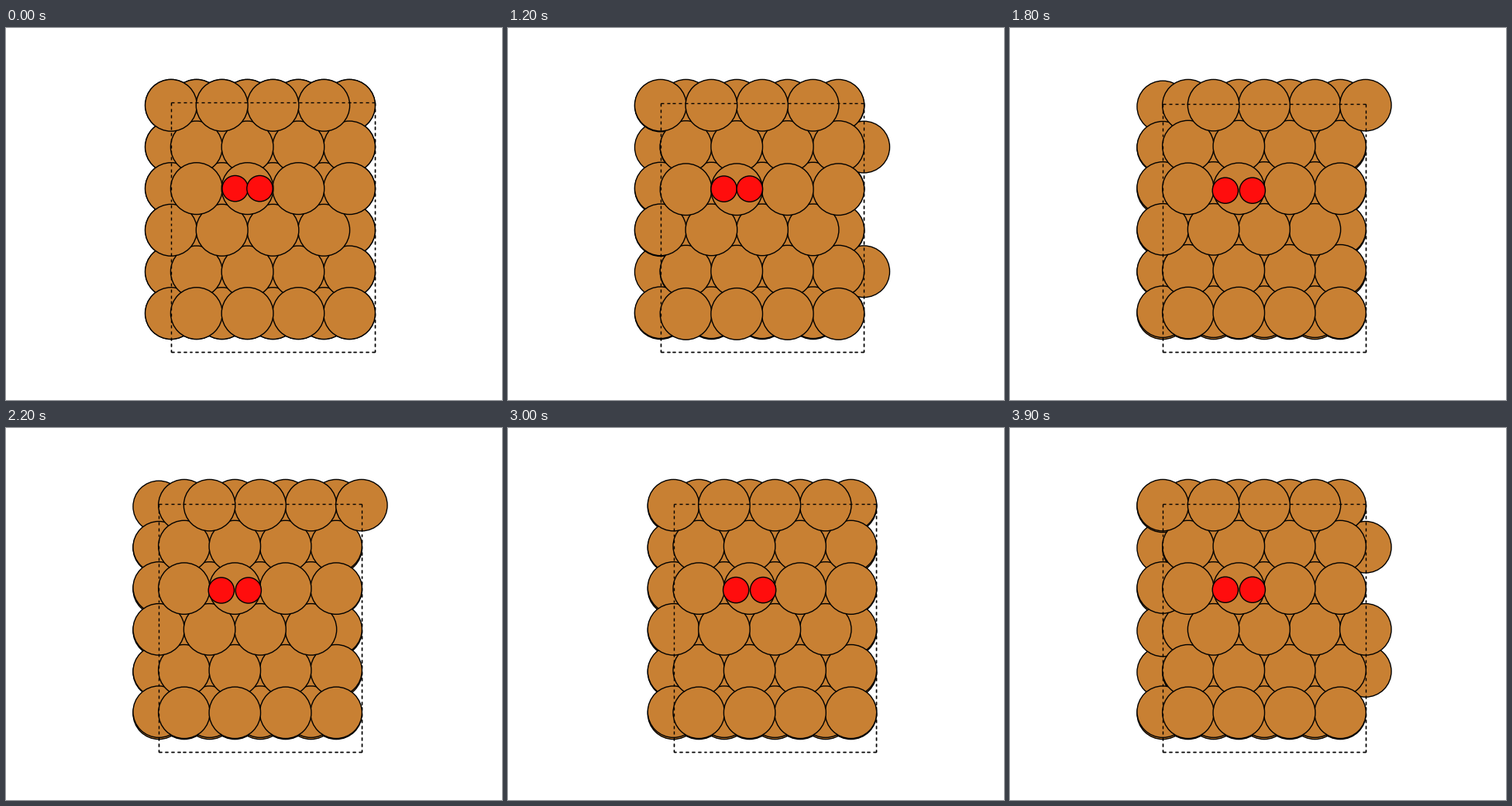
Write a matplotlib script that moves like this. It is 640 px wide and 480 px high and loops after 4 s.

```python
import math

import matplotlib.pyplot as plt
import numpy as np
from matplotlib.animation import FuncAnimation
from matplotlib.collections import LineCollection
from matplotlib.patches import Circle

WIDTH, HEIGHT, DPI = 640, 480, 100
FRAMES, INTERVAL = 40, 100
COPPER = (200 / 255, 128 / 255, 51 / 255)
OXYGEN = (1, 13 / 255, 13 / 255)
ROWS, COLS, LAYERS = 6, 4, 4
CENTER_X, FLOOR_Y = 328, 418.4
CONTENT_H = 352
CELL_RATIO = math.sqrt(1.5)  # cell height / width
TOP_ROW = 0.9894             # first row above the cell floor, in cell heights
RADIUS = 0.1037              # copper radius, in cell heights
SETTLED = 1900               # time (ms) when the surface has relaxed

# (start time, rows whose edge atom jumps to the far side of the cell)
WRAPS = [(0, ()), (100, (0, 1, 3, 4)), (900, (1, 4)), (1500, (0,)),
         (2400, ()), (3300, (1, 3, 4))]


def depth_of(row, layer):
    """Close-packed stacking: three heights per layer, 2 is the outermost."""
    return (1, 0, 2)[row % 3] - 3 * layer


def is_half(row, layer):
    """Atoms of every other layer sit half a column to the right."""
    return (layer + (row % 3 > 0)) % 2 == 1


def first_edge_layer(row):
    return 0 if row % 3 == 0 else 1


def relaxation(t):
    return np.interp(t, [0, 500, 1200, 1800], [0, 0.33, 0.45, 1])


def lift(depth, t):
    """Upward shift in pixels, strongest halfway into the free layers."""
    rise = 2.3 * math.exp(-(depth + 0.5) ** 2 / 8) * relaxation(t)
    if depth == 2 and t < SETTLED:
        rise -= 1.2 * math.sin(math.pi * t / SETTLED)
    return rise


def dashes(start, end, count):
    """Split a line into equal dashes and gaps, with a dash at both ends."""
    start, end = np.array(start), np.array(end)
    step = (end - start) / (2 * count - 1)
    return [(start + 2 * i * step, start + (2 * i + 1) * step)
            for i in range(count)]


fig = plt.figure(figsize=(WIDTH / DPI, HEIGHT / DPI), dpi=DPI,
                 facecolor="white")
ax = fig.add_axes([0, 0, 1, 1])
ax.set_xlim(0, WIDTH)
ax.set_ylim(HEIGHT, 0)
ax.axis("off")


def add_circle(color, zorder):
    circle = Circle((0, 0), 1, facecolor=color, edgecolor="black",
                    linewidth=1, zorder=zorder)
    return ax.add_patch(circle)


def add_cell(zorder):
    lines = LineCollection([], colors="black", linewidths=1, zorder=zorder)
    return ax.add_collection(lines)


# Atoms near the oxygen column lie slightly in front of their neighbours
atoms = {(row, layer, col): add_circle(
             COPPER, 20 + depth_of(row, layer) - 0.1 * abs(col - 1))
         for row in range(ROWS)
         for layer in range(LAYERS)
         for col in range(COLS)}
oxygens = [add_circle(OXYGEN, 30 + i) for i in range(2)]
cell_faces = [add_cell(1), add_cell(40)]  # behind and in front of the atoms


def update(frame):
    t = frame * INTERVAL
    cell_h = (CONTENT_H - lift(1, t)) / (TOP_ROW + RADIUS)
    cell_w = cell_h / CELL_RATIO
    radius = RADIUS * cell_h
    pitch = cell_w / COLS
    wrapped = [rows for start, rows in WRAPS if start <= t][-1]
    left = CENTER_X - cell_w * (0.5 if wrapped else 0.4375)
    right, top = left + cell_w, FLOOR_Y - cell_h

    def row_y(row):
        return FLOOR_Y - cell_h * (TOP_ROW - row / ROWS)

    for (row, layer, col), atom in atoms.items():
        free = layer < 2
        y = row_y(row) - (lift(depth_of(row, layer), t) if free else 0)
        place = col + 0.5 * is_half(row, layer)
        if col == 0 and row in wrapped and layer == first_edge_layer(row):
            place += COLS
        atom.center = (left + place * pitch, y)
        atom.radius = radius

    gap = 15.9 + 1.6 * relaxation(t)
    drop = np.interp(t, [1200, 1800, 3900], [0, 1.5, 0.5])
    for side, oxygen in zip((-1, 1), oxygens):
        oxygen.center = (left + 1.5 * pitch + side * gap, row_y(2) + drop)
        oxygen.radius = radius / 2

    outline = (dashes((left, FLOOR_Y), (right, FLOOR_Y), 34)
               + dashes((left, top), (right, top), 34)
               + dashes((left, FLOOR_Y), (left, top), 42)
               + dashes((right, FLOOR_Y), (right, top), 42))
    for face in cell_faces:
        face.set_segments(outline)
    return [*atoms.values(), *oxygens, *cell_faces]


anim = FuncAnimation(fig, update, frames=FRAMES, interval=INTERVAL,
                     init_func=lambda: update(0), repeat=True, repeat_delay=0)
plt.show()
```
